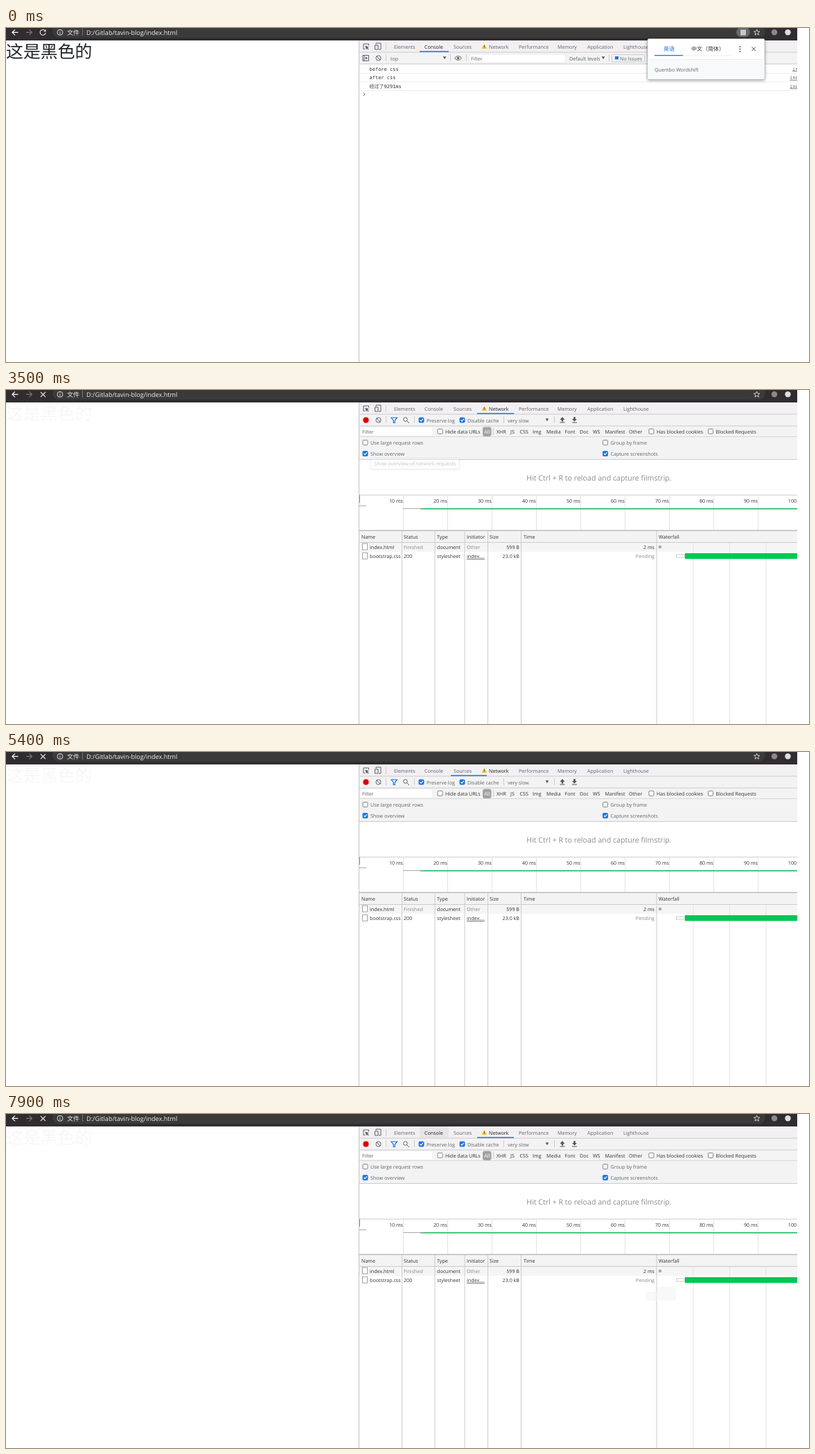
Recreate the animation shown at these times as an HTML page. Size 1159x483 px, loop 8 s.

```html
<!DOCTYPE html>
<html lang="zh">
<head>
<meta charset="utf-8">
<title>DevTools</title>
<style>
html, body { margin: 0; width: 100%; height: 100%; overflow: hidden; background: #fff; }
svg { display: block; width: 1159px; height: 483px; }
text { font: 7.15px "Open Sans", "Noto Sans", "Noto Sans CJK SC", sans-serif; fill: #333; text-rendering: geometricPrecision; white-space: pre; }
.mono { font: 7px "DejaVu Sans Mono", "Noto Sans CJK SC", monospace; }
.dim { fill: #5f6368; }
.pale { fill: #888; }
.url { font-size: 9.1px; fill: #eee; }
.zh { font: 8px "Noto Sans CJK SC", sans-serif; }
.title { font: 24.9px "Noto Sans CJK SC", sans-serif; }
.big { font-size: 10.65px; fill: #8c8c8c; }
.mid { font-size: 8.4px; fill: #6b6b6b; }
.link { text-decoration: underline; }
.blue { fill: #1a73e8; }
.line { fill: none; stroke: #5f6368; stroke-width: 1; }
.light { fill: none; stroke: #ddd; stroke-width: 1.2; }

.anim { animation: 8s step-end infinite; }
.title { animation-name: title; }
.first { animation-name: first; }
.after { animation-name: after; }
.console { animation-name: console; }
.again { animation-name: again; }
.net { animation-name: net; }
.empty { animation-name: empty; }
.table { animation-name: table; }
.late { animation-name: late; }
.tip1 { animation-name: tip1; }
.tip2 { animation-name: tip2; }
.smudge { animation-name: smudge; }
.large { animation-name: large; }
.mark { animation-name: mark; }
.tabC { animation-name: tabC; }
.tabN { animation-name: tabN; }
.hoverC { animation-name: hoverC; }
.hoverN { animation-name: hoverN; }
@keyframes title { 0% { fill: #212529 } 7.5%, 100% { fill: #f7f7f7 } }
@keyframes first { 0% { opacity: 1 } 7.5%, 100% { opacity: 0 } }
@keyframes after { 0% { opacity: 0 } 7.5%, 100% { opacity: 1 } }
@keyframes console { 0% { opacity: 1 } 7.5% { opacity: 0 } 55% { opacity: 1 } 67.5%, 100% { opacity: 0 } }
@keyframes again { 0% { opacity: 0 } 55% { opacity: 1 } 67.5%, 100% { opacity: 0 } }
@keyframes net { 0% { opacity: 0 } 7.5% { opacity: 1 } 55% { opacity: 0 } 67.5%, 100% { opacity: 1 } }
@keyframes empty { 0% { opacity: 1 } 40%, 100% { opacity: 0 } }
@keyframes table { 0% { opacity: 0 } 40%, 100% { opacity: 1 } }
@keyframes late { 0% { opacity: 0 } 41.25%, 100% { opacity: 1 } }
@keyframes tip1 { 0% { opacity: 0 } 43.75% { opacity: .35 } 45% { opacity: 1 } 46.25% { opacity: .35 } 47.5%, 100% { opacity: 0 } }
@keyframes tip2 { 0% { opacity: 0 } 85% { opacity: .4 } 86.25% { opacity: 1 } 93.75% { opacity: .4 } 95%, 100% { opacity: 0 } }
@keyframes smudge { 0% { opacity: 0 } 90% { opacity: 1 } 91.25%, 100% { opacity: .6 } }
@keyframes large { 0% { fill: #5f6368 } 31.25% { fill: #222 } 32.5%, 100% { fill: #5f6368 } }
@keyframes mark {
  0% { x: 597px; width: 42px } 7.5% { x: 680px; width: 53px }
  55% { x: 636px; width: 41px } 56.25% { x: 597px; width: 42px }
  67.5% { x: 642px; width: 52px } 68.75%, 100% { x: 680px; width: 53px }
}
@keyframes tabC { 0% { fill: #222 } 7.5% { fill: #5f6368 } 47.5% { fill: #222 } 67.5% { fill: #5f6368 } 97.5%, 100% { fill: #222 } }
@keyframes tabN { 0% { fill: #5f6368 } 7.5% { fill: #222 } 55% { fill: #5f6368 } 61.25%, 100% { fill: #222 } }
@keyframes hoverC { 0% { opacity: 0 } 47.5% { opacity: 1 } 55% { opacity: 0 } 97.5%, 100% { opacity: 1 } }
@keyframes hoverN { 0% { opacity: 0 } 61.25% { opacity: 1 } 67.5%, 100% { opacity: 0 } }
</style>
</head>
<body>
<svg id="stage" viewBox="0 0 1159 483"></svg>
<script>
const rect = (x, y, w, h, fill, more = '') => `<rect x="${x}" y="${y}" width="${w}" height="${h}" fill="${fill}" ${more}/>`;
const text = (x, y, s, cls = '', more = '') => `<text x="${x}" y="${y}" class="${cls}" ${more}>${s}</text>`;
const right = (x, y, s, cls = '') => text(x, y, s, cls, 'text-anchor="end"');
const center = (x, y, s, cls = '') => text(x, y, s, cls, 'text-anchor="middle"');
const path = (d, cls = 'line', more = '') => `<path d="${d}" class="${cls}" ${more}/>`;
const dot = (x, y, r, fill) => `<circle cx="${x}" cy="${y}" r="${r}" fill="${fill}"/>`;
const group = (cls, ...parts) => `<g class="anim ${cls}">${parts.join('')}</g>`;
const vline = (x, y, h, fill = '#ccc') => rect(x, y, 1, h, fill);
const hline = (y, fill = '#ccc') => rect(510, y, 632, 1, fill);
const each = (list, fn) => list.map(fn).join('');
const caret = (x, y) => `<path d="M${x - 2.2} ${y - 1.8}h4.4l-2.2 4z" fill="#555"/>`;

const check = (x, y, on) => rect(x + .5, y + .5, 7, 7, on ? '#1a73e8' : '#fff', `rx="1.2" stroke="${on ? '#1a73e8' : '#767676'}" stroke-width=".9"`) +
  (on ? path(`M${x + 2} ${y + 4}l1.6 1.7 2.8-3.5`, '', 'fill="none" stroke="#fff" stroke-width="1.1"') : '');

const option = (x, y, s, on, cls = 'dim') => check(x, y - 7, on) + text(x + 11.5, y, s, cls);

const clear = `<circle cx="537.5" cy="43.5" r="3.6" class="line"/>` + path('M535 41l5 5');

const tip = (cls, x, y, w, s) => group(cls,
  rect(x + .5, y + .5, w, 16, '#f9f9f9', 'rx="1.5" stroke="#d0d0d0" style="filter:drop-shadow(0 1px 1px #0002)"'),
  text(x + 5.5, y + 11, s, 'dim'));

function browser() {
  return rect(0, 0, 1142, 18, '#302c30') +
    rect(67, -4, 1029, 18, '#3a3a3a', 'rx="9"') +
    path('M17.5 6.3h-8M13 2.3l-4 4 4 4', 'light', 'style="stroke:#fff"') +
    path('M29 6.3h8M33.500 2.300l4 4-4 4', 'light', 'style="stroke:#777"') +
    group('first', path('M56.3 3.700a4 4 0 1 0 .9 3.200', 'light'), path('M57.600 1.800v3.500h-3.500z', '', 'fill="#ddd"')) +
    group('after', path('M50 3l7 7M57 3l-7 7', 'light')) +
    '<circle cx="78" cy="6.300" r="4" class="light" style="stroke-width:1"/>' + path('M78 5.700v3M78 3.600v1', 'light', 'style="stroke-width:1"') +
    text(88, 9.500, '文件', 'url') + rect(110, 1, 1, 10, '#777') +
    text(116, 9.500, 'D:/Gitlab/tavin-blog/index.html', 'url') +
    group('first', rect(1054, -1, 20, 14, '#66686b', 'rx="7"'), rect(1060, 2.500, 8, 8, '#c8c8c8')) +
    path('M1083.700 2l1.200 2.900 3.100.2-2.400 2 .8 3-2.700-1.700-2.700 1.700.8-3-2.400-2 3.100-.2z', 'light', 'style="stroke-width:.9"') +
    dot(1109, 6.300, 4.200, '#8a8a8a') + dot(1128.500, 6.300, 4.200, '#ddd');
}

function tabs() {
  const names = [[560, 'Elements'], [604, 'Console', 'anim tabC'], [646, 'Sources'], [697, 'Network', 'anim tabN'],
    [740, 'Performance'], [796, 'Memory'], [839, 'Application'], [891, 'Lighthouse']];
  return rect(510, 18, 632, 17, '#f3f0f4') +
    group('hoverC', rect(597, 18, 42, 16, '#e7e5e8')) +
    group('hoverN', rect(680, 18, 53, 16, '#e7e5e8')) +
    path('M518 30.500h-2v-7.500h7.500v2.500') + path('M518.500 25.500l5.500 2-2.300 1 2 2-1 1-2-2-1 2z', '', 'fill="#5f6368"') +
    path('M534 24v-2h7v9h-3M532.500 25h4.500v6h-4.500z') + vline(548, 22, 10) +
    each(names, ([x, s, c = 'dim']) => text(x, 29.500, s, c)) +
    '<path d="M690.300 23.300l3.600 6.500h-7.200z" fill="#f4b400"/>' + rect(689.900, 25.500, .9, 2, '#444') +
    hline(34.500) + rect(597, 33.300, 42, 1.500, '#1a73e8', 'class="anim mark"');
}

function consolePanel() {
  const row = (y, s, x, link) => text(524.500, y, s, 'mono') + text(x, y, link, 'mono link dim') + hline(y + 3.500, '#eee');
  const prompt = y => path(`M515.700 ${y - 2.200}l2.500 2.200-2.500 2.200`, 'line', 'style="stroke:#367cf1"');
  const ghost = '#f8f8f8';
  return group('console',
    rect(510, 52, 632, 431, '#fff'), rect(510, 35, 632, 17, '#f3f3f3'), hline(51.500),
    path('M515 39.500h8.500v8h-8.500zM517 39.500v8'), '<path d="M518.800 41.300l3.200 2.200-3.200 2.200z" fill="#5f6368"/>',
    clear, each([548, 641, 664, 870], x => vline(x, 38, 10)),
    text(555, 46.500, 'top', 'dim'), caret(633, 43),
    path('M647.500 43.500q5-6 10 0q-5 6-10 0z'), dot(652.500, 43.500, 1.800, '#5f6368'),
    rect(668.500, 38, 138.500, 12, '#fff', 'stroke="#e0e0e0" stroke-width=".6"'), text(671, 46.800, 'Filter', 'dim'),
    text(813, 46.500, 'Default levels', 'dim'), caret(862, 43),
    rect(874.500, 38.500, 47, 10.500, '#f3f3f3', 'stroke="#ccc" rx="1"'),
    rect(879, 41, 5, 4.500, '#1a73e8'), text(886, 46.500, 'No Issues', 'dim'),
    group('again',
      rect(510, 53, 632, 12, ghost), rect(512, 54, 103, 11, '#fff'),
      rect(510, 66, 632, 34, ghost), rect(510, 203, 632, 31, ghost),
      hline(152, '#fafafa'), rect(573, 171, 569, 1, '#f7f7f7'),
      each([571, 619, 695, 743, 939, 992, 1044, 1097], x => vline(x, 234, 249, '#fafafa')),
      rect(980, 236, 162, 8, '#f5f5f5'), prompt(71)),
    row(61.500, 'before css', 1135, 'index.html:9'),
    group('first',
      row(74, 'after css', 1131, 'index.html:14'),
      row(86.500, '经过了9291ms', 1131, 'index.html:18'), prompt(96)));
}

function tableView() {
  const heads = [[513, 'Name'], [574, 'Status'], [622, 'Type'], [665, 'Initiator'], [698, 'Size'], [747, 'Time'], [942, 'Waterfall']];
  const row = (y, name, status, type, from, size, time, cls) =>
    rect(514.500, y - 8, 7, 9, '#fff', 'stroke="#999" stroke-width=".9"') + text(525, y, name) + text(574, y, status, cls[0]) +
    text(622, y, type) + text(665, y, from, cls[1]) + right(741, y, size) + right(936, y, time, cls[2]);
  return group('table',
    rect(510, 167, 10, 1, '#aaa'),
    group('late', rect(573, 171, 26, 1, '#aaa'), rect(598, 171, 5, 1.500, '#6d9a7c'), rect(603, 171, 539, 1.500, '#12b759')),
    rect(510, 204, 632, 16, '#f3f3f3'), rect(510, 221, 632, 13, '#f5f5f5'),
    each([991.500, 1044, 1096.500], x => vline(x, 221, 262, '#e4e4e4')),
    hline(220), each([571, 618.500, 661.500, 695, 743, 938.500], x => vline(x, 204, 279)),
    each(heads, ([x, s]) => text(x, 215, s)),
    row(230, 'index.html', 'Finished', 'document', 'Other', '599 B', '2 ms', ['pale', 'pale', '']),
    rect(942, 225, 4, 4, '#aaa'),
    group('late',
      row(243.300, 'bootstrap.css', '200', 'stylesheet', 'index....', '23.0 kB', 'Pending', ['', 'link', 'pale']),
      rect(967.500, 238, 12, 4, '#fff', 'stroke="#ccc"'), rect(980, 236, 162, 8.300, '#00c853')));
}

function networkPanel() {
  const types = [[708, 'XHR'], [728, 'JS'], [741.500, 'CSS'], [760, 'Img'], [780, 'Media'], [806.500, 'Font'],
    [828, 'Doc'], [847, 'WS'], [864.500, 'Manifest'], [899, 'Other']];
  const ticks = [...Array(10).keys()];
  return group('net',
    rect(510, 101, 632, 382, '#fff'), rect(510, 35, 632, 65, '#f3f3f3'),
    dot(519.500, 43.500, 5, '#f5c5c5'), dot(519.500, 43.500, 3.900, '#d80000'), clear,
    each([548, 589, 718, 791], x => vline(x, 38, 10)),
    path('M556 40h8.500l-3.300 4v3.500h-2v-3.500z', 'line', 'style="stroke:#1a73e8;stroke-width:1.200"'),
    '<circle cx="576.500" cy="42.500" r="2.800" class="line"/>', path('M578.500 44.500l3.500 3.500'),
    option(595.500, 46.500, 'Preserve log', 1), option(654.500, 46.500, 'Disable cache', 1),
    text(724, 46.500, 'very slow', 'dim'), caret(781, 43),
    '<path d="M803 39l3.500 4h-2.200v2.500h-2.600v-2.500h-2.200zM799.500 46.500h7v1h-7zM820.500 45.500l3.500-3.500h-2.200v-3h-2.600v3h-2.200zM817 46.500h7v1h-7z" fill="#555"/>',
    hline(51.500), rect(512, 54, 103, 11.500, '#fff'), text(514, 62.800, 'Filter', 'dim'),
    option(622.500, 62.800, 'Hide data URLs', 0, ''),
    rect(688, 53.500, 12.500, 13.500, '#a2a2a2', 'rx="3"'), center(694.300, 62.800, 'All', '').replace('<text', '<text style="fill:#fff"'),
    vline(703, 55, 10), each(types, ([x, s]) => text(x, 62.800, s)),
    option(927.500, 62.800, 'Has blocked cookies', 0, ''), option(1013, 62.800, 'Blocked Requests', 0, ''),
    hline(67, '#d8d8d8'),
    option(514.500, 79, 'Use large request rows', 0, 'anim large'), option(514.500, 95, 'Show overview', 1),
    option(861, 79, 'Group by frame', 0), option(861, 95, 'Capture screenshots', 1),
    hline(100), center(856, 130.500, 'Hit Ctrl + R to reload and capture filmstrip.', 'big'),
    hline(151.500), each(ticks, i => vline(573 + 64 * i, 152, 51, '#e4e4e4') + right(573 + 64 * i + (i > 8 ? 4 : 0), 163, `${i * 10 + 10} ms`)),
    rect(509.500, 152, 1.200, 11, '#666'), rect(510, 202.500, 632, 1.500, '#bbb'),
    group('empty',
      center(856, 399.500, 'Recording network activity...', 'mid'),
      center(856, 417, 'Perform a request or hit <tspan font-weight="600">Ctrl + R</tspan> to record the reload.', 'mid'),
      center(856, 434.700, 'Learn more', 'mid link').replace('<text', '<text style="fill:#1a73e8"')),
    tableView(),
    group('smudge', rect(923, 257, 20, 13, '#f4f4f4', 'rx="3"'), rect(940, 250, 27, 20, '#f4f4f4', 'rx="3"')),
    tip('tip1', 526, 98, 128, 'Show overview of network requests'),
    tip('tip2', 606, 50, 160, 'Do not clear log on page reload / navigation'));
}

function popup() {
  return group('first',
    rect(926, 15.500, 169, 59, '#fff', 'rx="2" stroke="#aaa" stroke-width=".6" style="filter:drop-shadow(0 1px 2px #0006)"'),
    rect(926.500, 45, 168, 29, '#f8f9fa'), rect(926.500, 45, 168, .7, '#e8eaed'),
    text(949, 33, '英语', 'zh blue', 'font-weight="700" style="fill:#1a73e8"'), text(989, 33, '中文（简体）', 'zh'),
    rect(977, 39.500, 70, .8, '#e8eaed'), rect(936, 39, 41, 1.300, '#1a73e8'),
    each([27, 30.500, 34], y => dot(1059.500, y, .9, '#444')),
    path('M1076.500 27.500l5.500 5.500M1082 27.500l-5.500 5.500', 'line', 'style="stroke:#444"'),
    text(936, 62.500, 'Quembo Wordshift', 'dim'));
}

document.getElementById('stage').innerHTML =
  text(0, 42.500, '这是黑色的', 'anim title') +
  rect(510, 18, 632, 465, '#fff') + consolePanel() + networkPanel() + tabs() +
  rect(509, 18, 1, 465, '#c4c4c4') + browser() + popup() + rect(1142, 0, 17, 483, '#fff');
</script>
</body>
</html>
```
